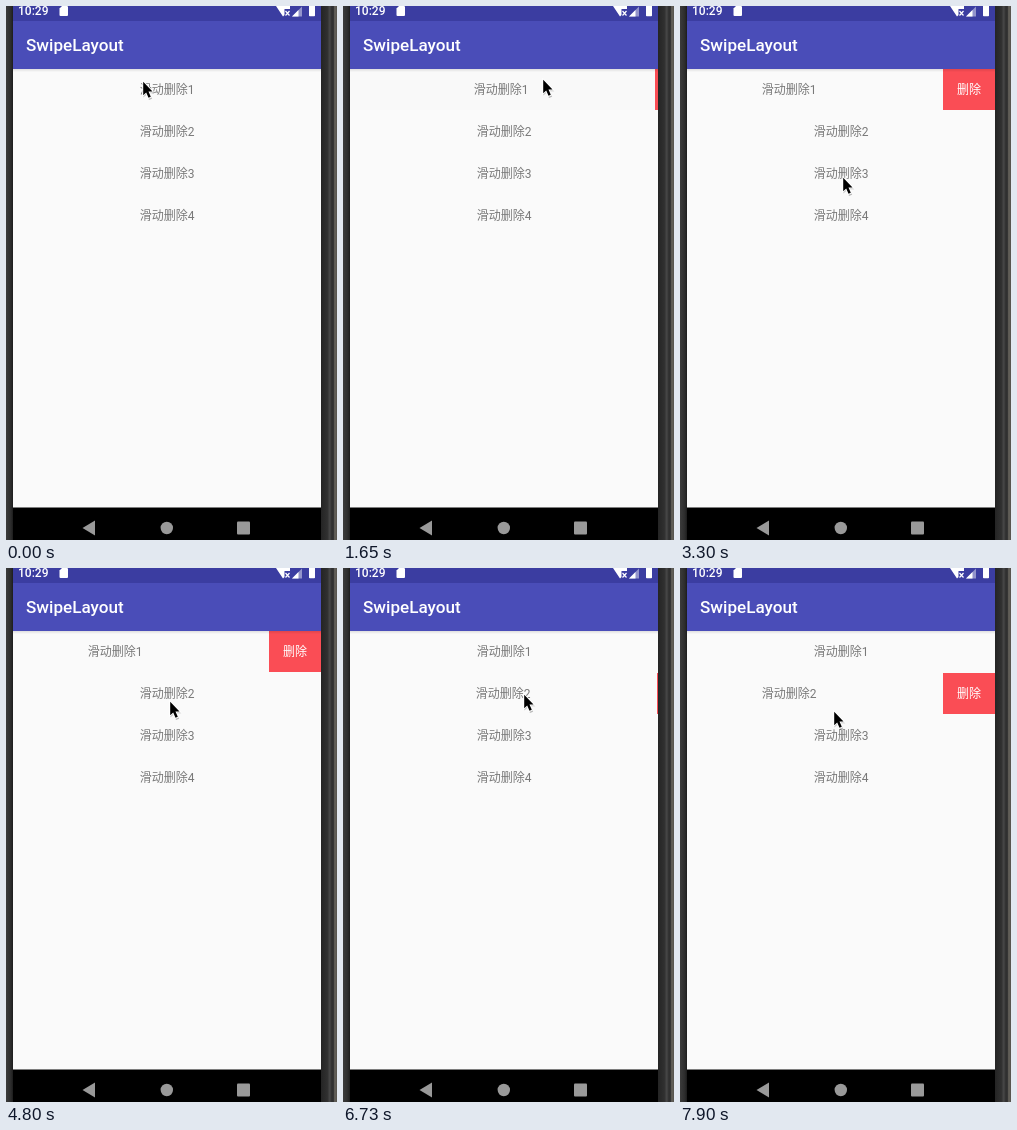
Animation of 331 by 534 pixels, one loop 8000 ms. Source, as an HTML page:

```html
<!DOCTYPE html>
<html lang="zh-CN">
<head>
<meta charset="utf-8">
<title>SwipeLayout</title>
<style>
  html, body { margin: 0; width: 100%; height: 100%; overflow: hidden; background: #2b2b2b; }
  svg { display: block; width: 331px; height: 534px; }
  text { font-family: Roboto, "Noto Sans CJK SC", "Noto Sans CJK", sans-serif; }
  .bar-text { fill: #fff; font-weight: 500; }
  .item { font-size: 12px; fill: #797979; text-anchor: middle; }
  .delete { font-size: 12px; font-weight: 500; fill: #fff; text-anchor: middle; }

  /* Every part holds its pose until the next step. */
  .slide, .press, #cursor { animation: 8s step-end infinite; }
  #row1 .slide { animation-name: slide1; }
  #row1 .press { animation-name: press1; }
  #row2 .slide { animation-name: slide2; }
  #row2 .press { animation-name: press2; }
  #cursor { animation-name: point; }

  @keyframes slide1 {
    0% { transform: translateX(0); }
    20.625% { transform: translateX(-3px); }
    22.5% { transform: translateX(-16px); }
    24.375% { transform: translateX(-31px); }
    26.25% { transform: translateX(-49px); }
    28.125% { transform: translateX(-52px); }
    69.25% { transform: translateX(-20px); }
    71.125%, 100% { transform: translateX(0); }
  }
  @keyframes press1 {
    0% { fill: #fafafa; }
    20.625% { fill: #f9f9f9; }
    22.5% { fill: #efefef; }
    24.375% { fill: #ebebeb; }
    28.125%, 100% { fill: #fafafa; }
  }
  @keyframes slide2 {
    0% { transform: translateX(0); }
    84.125% { transform: translateX(-1px); }
    86% { transform: translateX(-13px); }
    87.875% { transform: translateX(-29px); }
    89.625% { transform: translateX(-44px); }
    91.5%, 100% { transform: translateX(-52px); }
  }
  @keyframes press2 {
    0% { fill: #fafafa; }
    86% { fill: #efefef; }
    87.875% { fill: #ebebeb; }
    93.25%, 100% { fill: #fafafa; }
  }
  @keyframes point {
    0% { transform: translate(137px, 75px); }
    1.875% { transform: translate(116px, 75px); }
    3.75% { transform: translate(99px, 75px); }
    7.5% { transform: translate(113px, 78px); }
    9.375% { transform: translate(148px, 79px); }
    11.25% { transform: translate(188px, 77px); }
    13.125% { transform: translate(209px, 75px); }
    16.875% { transform: translate(209px, 74px); }
    20.625% { transform: translate(200px, 73px); }
    22.5% { transform: translate(184px, 73px); }
    24.375% { transform: translate(165px, 73px); }
    26.25% { transform: translate(143px, 74px); }
    28.125% { transform: translate(131px, 75px); }
    35.625% { transform: translate(136px, 88px); }
    37.5% { transform: translate(148px, 123px); }
    39.375% { transform: translate(159px, 158px); }
    41.25% { transform: translate(163px, 171px); }
    58.125% { transform: translate(165px, 160px); }
    60% { transform: translate(164px, 133px); }
    61.875% { transform: translate(159px, 106px); }
    63.75% { transform: translate(154px, 96px); }
    65.5% { transform: translate(151px, 123px); }
    74.875% { transform: translate(156px, 124px); }
    76.75% { transform: translate(167px, 125px); }
    78.625% { transform: translate(180px, 127px); }
    80.375% { transform: translate(187px, 127px); }
    84.125% { transform: translate(181px, 126px); }
    86% { transform: translate(168px, 127px); }
    87.875% { transform: translate(152px, 129px); }
    89.625% { transform: translate(137px, 131px); }
    91.5% { transform: translate(132px, 134px); }
    93.25% { transform: translate(143px, 140px); }
    95.125% { transform: translate(157px, 146px); }
    98.75%, 100% { transform: translate(154px, 143px); }
  }
</style>
</head>
<body>
<svg viewBox="0 0 331 534">
  <defs>
    <linearGradient id="left">
      <stop offset="0" stop-color="#3c3c3c"/>
      <stop offset=".7" stop-color="#2c2c2c"/>
      <stop offset="1" stop-color="#1c1c1c"/>
    </linearGradient>
    <linearGradient id="right">
      <stop offset="0" stop-color="#242424"/>
      <stop offset=".4" stop-color="#303030"/>
      <stop offset=".55" stop-color="#484848"/>
      <stop offset=".68" stop-color="#2e2e2e"/>
      <stop offset=".78" stop-color="#343434"/>
      <stop offset=".86" stop-color="#66635c"/>
      <stop offset="1" stop-color="#54524c"/>
    </linearGradient>
    <linearGradient id="shade" x2="0" y2="1">
      <stop offset="0" stop-opacity=".11"/>
      <stop offset="1" stop-opacity="0"/>
    </linearGradient>
  </defs>

  <path fill="#fafafa" d="M7 63H315V502H7z"/>

  <g id="row1">
    <g class="slide">
      <path class="press" fill="#fafafa" d="M7 63H315V104H7z"/>
      <path fill="#fa4d55" d="M315 63H367V104H315z"/>
      <text class="item" x="161" y="88">滑动删除1</text>
      <text class="delete" x="341" y="88">删除</text>
    </g>
  </g>
  <g id="row2" transform="translate(0 42)">
    <g class="slide">
      <path class="press" fill="#fafafa" d="M7 63H315V104H7z"/>
      <path fill="#fa4d55" d="M315 63H367V104H315z"/>
      <text class="item" x="161" y="88">滑动删除2</text>
      <text class="delete" x="341" y="88">删除</text>
    </g>
  </g>
  <text class="item" x="161" y="172">滑动删除3</text>
  <text class="item" x="161" y="214">滑动删除4</text>
  <path fill="url(#shade)" d="M7 63H315V66H7z"/>

  <!-- the phone's edges hide whatever slides off the screen -->
  <path fill="url(#left)" d="M0 0H7V534H0z"/>
  <path fill="url(#right)" d="M315 0H331V534H315z"/>
  <path fill="#2b2b2b" d="M331 0H400V534H331z"/>

  <!-- status bar and title -->
  <path fill="#3b3da1" d="M7 0H315V15H7z"/>
  <path fill="#4a4db8" d="M7 15H315V63H7z"/>
  <text class="bar-text" x="12" y="9" font-size="12">10:29</text>
  <text class="bar-text" x="20" y="45" font-size="17.1">SwipeLayout</text>
  <g fill="#fff">
    <path d="M53.5 2.5L56 0H61Q62 0 62 1V9Q62 10 61 10H54.5Q53.5 10 53.5 9z"/>
    <path d="M270 0H284V3H278.5V9L277 10.5z"/>
    <path d="M286 10.5L296 .5V10.5z" fill-opacity=".45"/>
    <path d="M286 10.5L292.5 4V10.5z"/>
    <rect x="303" y="-2" width="6" height="12.3" rx=".8"/>
  </g>
  <path stroke="#fff" stroke-width="1.2" d="M279.5 5L283.5 9.5M283.5 5L279.5 9.5"/>

  <!-- navigation bar -->
  <path d="M7 501.6H315V534H7z"/>
  <g fill="#999">
    <path d="M76.5 522L89 514.5V529.5z"/>
    <circle cx="160.8" cy="522" r="6.2"/>
    <rect x="231" y="515.5" width="13" height="13" rx="1"/>
  </g>

  <g id="cursor">
    <path fill="#000" fill-opacity=".25" d="M.3 2V16.5L3.6 13.5 6 19 9.2 17.8 6.8 12.3H11.3z"/>
    <path stroke="#fff" stroke-width="1.8" paint-order="stroke" d="M.2 .8V14.2L3.2 11.5 5.5 16.7 7.8 15.7 5.5 10.6H9.5z"/>
  </g>
</svg>
</body>
</html>
```
